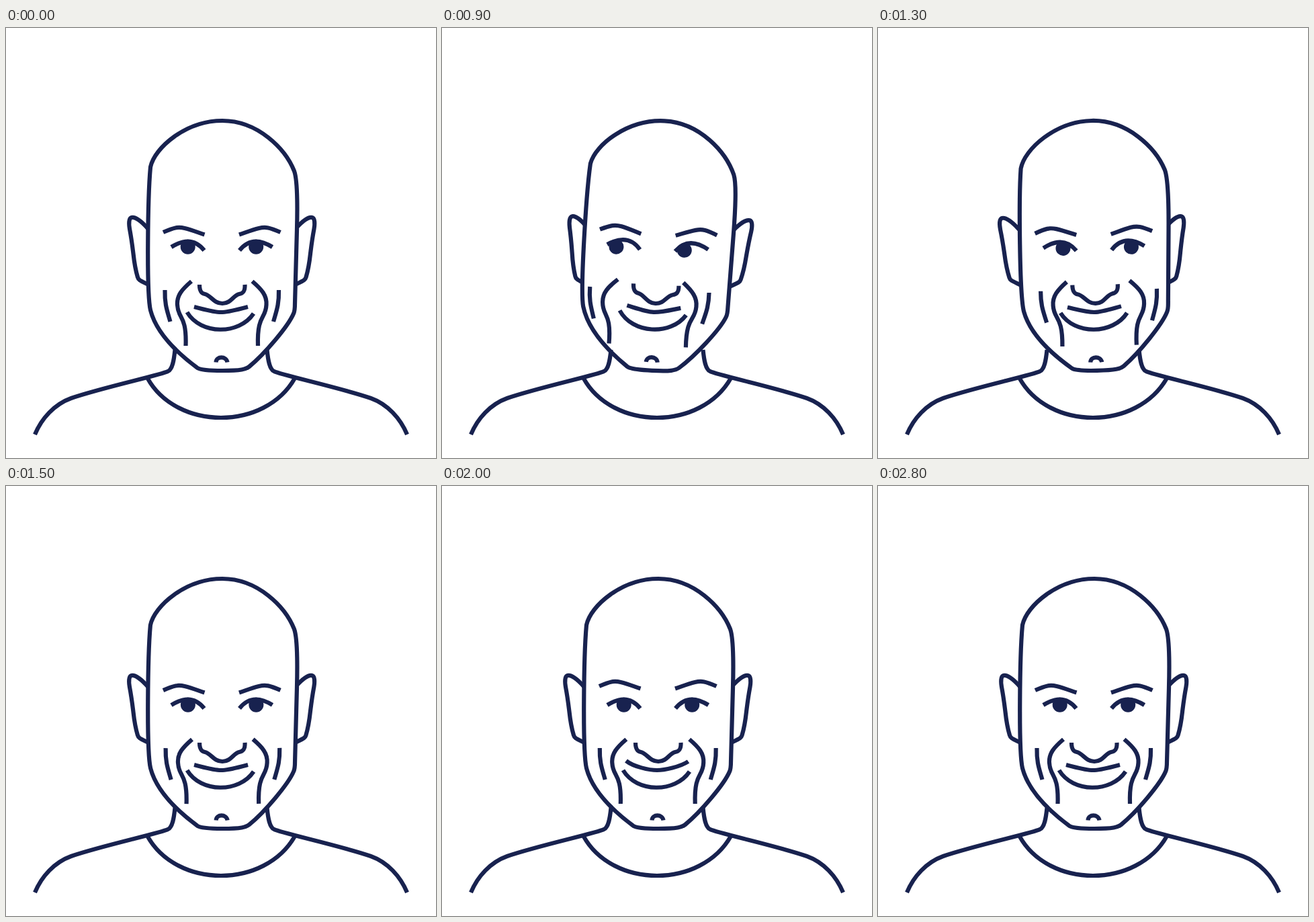
Write an HTML page that moves like this. It is 640 by 640 pixels and loops after 2900 ms.

```html
<!DOCTYPE html>
<html lang="en">
<head>
<meta charset="utf-8">
<title>Head shake</title>
<style>
  html, body { margin: 0; height: 100%; overflow: hidden; background: #fff; }
  svg { display: block; width: 100vw; height: 100vh; }
  path { fill: none; stroke: #18224f; stroke-width: 6.200; }
  .skull { fill: #fff; }
  circle { fill: #18224f; }
</style>
</head>
<body>
<svg viewBox="0 0 640 640">
  <defs>
    <path id="ear" d="M219 307L211 298.5C201 287 192 281 187 282C183 283 182.500 290 184 299C187 315 188 324 189.500 336C191 350 193 361 196 371C197 375 200 376 211 381.500L221 387"/>
    <path id="brow" d="M234 304C250 297 256 295.500 266 298C276 300.500 285 304 295.500 307.500"/>
    <path id="lid" d="M246 326C262 316 280 312 295 331"/>
    <path id="fold" d="M276 377C262 389 254 398 255 412C256 434 269 426 267.500 473"/>
    <path id="wrinkle" d="M236.500 390C236 412 240 421 244.500 437"/>
    <path id="shoulder" d="M251.500 479C250 494 248 508 241 511C232 516 140 536 97 551C72 560 53 581 43 605"/>
  </defs>

  <g id="head">
    <use class="ear" href="#ear"/>
    <g class="mirror"><use class="ear" href="#ear"/></g>
    <path class="skull" d="M215 207C221 178 268 138 322 138C375 138 416 180 429 213C433 224 434 262 433 300L430 410C430 418 430 421 428 425C420 444 385 485 362 504C357 508 350 510 322 510C295 510 288 508 285 506C258 486 224 455 215 420C209 395 211 250 215 207Z"/>
    <g id="brows">
      <use href="#brow"/>
      <g class="mirror"><use href="#brow"/></g>
    </g>
    <use href="#lid"/>
    <g class="mirror"><use href="#lid"/></g>
    <g id="pupils">
      <circle cx="270.700" cy="325.700" r="11"/>
      <circle cx="372.200" cy="325.700" r="11"/>
    </g>
    <use class="fold" href="#fold"/>
    <use class="wrinkle" href="#wrinkle"/>
    <g class="mirror">
      <use class="fold" href="#fold"/>
      <use class="wrinkle" href="#wrinkle"/>
    </g>
    <path d="M288 382C288 392 291 395 296 396C305 398 309 410 322 410C335 410 338 398 347 396C353 395 356 392 355.500 382"/>
    <path id="mouth"/>
    <path d="M269.500 423C290 457 347 457 368.500 425"/>
    <path d="M312.500 497.500C313 488 328 488 329.500 497.500"/>
  </g>

  <use href="#shoulder"/>
  <use href="#shoulder" transform="matrix(-1 0 0 1 640 0)"/>
  <path d="M210.500 521C232 560 276 580 320 580S408 560 430 521"/>
</svg>
<script>
const LOOP = 2900, STEP = 100;
const TURN = [[600, 0], [900, 1], [1200, -1], [1600, 0]];
const SMILE = [[1500, 0], [1800, 1], [2300, 1], [2800, 0]];

const byId = id => document.getElementById(id);
const all = name => [...document.querySelectorAll('.' + name)];
const head = byId('head'), brows = byId('brows'), pupils = byId('pupils'), mouth = byId('mouth');
const ears = all('ear'), folds = all('fold'), wrinkles = all('wrinkle');
const move = (node, x, y) => node.setAttribute('transform', `translate(${x} ${y})`);

all('mirror').forEach(g => g.setAttribute('transform', 'matrix(-1 0 0 1 642.5 0)'));

// Value of a keyframe track, easing out between neighbouring keys
function track(keys, t, power) {
  let [t0, v0] = keys[0];
  for (const [t1, v1] of keys) {
    if (t < t1) return t <= t0 ? v0 : v0 + (v1 - v0) * (1 - ((t1 - t) / (t1 - t0)) ** power);
    [t0, v0] = [t1, v1];
  }
  return v0;
}

function draw(t) {
  const turn = track(TURN, t, 3);
  const lag = track(TURN, t, 1.5);
  const smile = track(SMILE, t, 3);
  const spread = Math.abs(turn);

  head.setAttribute('transform', `rotate(${2.87 * turn} 320 322)`);
  move(pupils, -11 * turn, 3 * spread);
  move(brows, 0, t >= 2000 && t < 2200 ? -6 : 0);

  // Left side first, then its mirror image with the turn reversed
  [1, -1].forEach((side, i) => {
    const near = side * turn;
    move(ears[i], 4.2 * near + (2.2 - 1.5 * side) * spread, (3.6 + side) * near);
    move(folds[i], -8 * side * lag - 3.5 * spread - 1.7 * smile, 0);
    move(wrinkles[i], -9 * side * lag - 4 * spread - 1.7 * smile, 0);
  });

  const left = 280 - 6 * smile, right = 360 + 6.5 * smile, y = 415 - 6 * smile;
  mouth.setAttribute('d', `M${left} ${y}C${left + 16 - 5 * smile} ${419 - smile} 309 423 320 423
    S${right - 16 + 4 * smile} ${419 - smile} ${right} ${y + smile}`);
}

const start = performance.now();
function frame() {
  const t = (performance.now() - start) % LOOP;
  draw(Math.floor(t / STEP) * STEP);
  requestAnimationFrame(frame);
}
frame();
</script>
</body>
</html>
```
